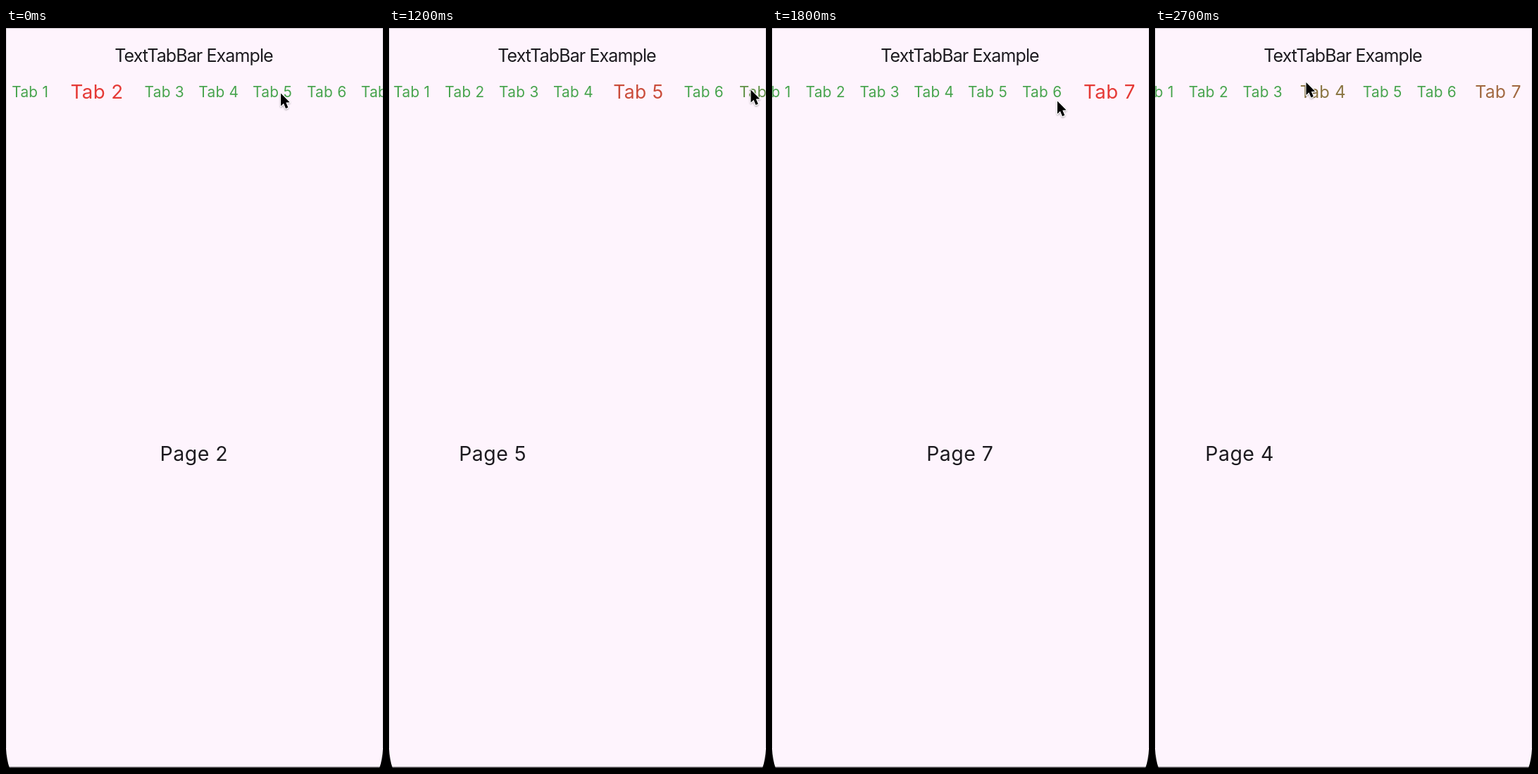
Animation, 535 px wide and 1048 px high, one loop 2.8 s. Source, as an HTML page:

```html
<!DOCTYPE html>
<html lang="en">
<head>
<meta charset="utf-8">
<title>TextTabBar Example</title>
<style>
  html, body { margin: 0; width: 100%; height: 100%; overflow: hidden; background: #fef4fd; }
  svg { display: block; width: 100%; height: 100%; }
  text { font-family: Inter, Roboto, "Open Sans", sans-serif; fill: #1d1b20; white-space: pre; }
  .title { font-size: 25px; letter-spacing: -0.9px; text-anchor: middle; }
  .page { font-size: 28.5px; letter-spacing: 0.016em; text-anchor: middle; }
  .tab { letter-spacing: 0.014em; }
</style>
</head>
<body>
<svg viewBox="0 0 535 1048">
  <defs>
    <filter id="shadow" x="-50%" y="-50%" width="200%" height="200%">
      <feDropShadow dx="0" dy="1.2" stdDeviation="1.2" flood-opacity="0.35"/>
    </filter>
  </defs>
  <rect width="535" height="1048" fill="#fef4fd"/>
  <text class="title" x="266.5" y="47.5">TextTabBar Example</text>
  <g id="pages"></g>
  <g id="tabs"></g>
  <path d="M0 0.5H535" stroke="#c9c2c9"/>
  <path d="M0.25 0V1020M534.75 0V1020" stroke="#a8a2a8" stroke-width="0.5"/>
  <path d="M0 1046.5H535" stroke="#9a959a"/>
  <path d="M0 1047.5H535" stroke="#3c3a3c"/>
  <path d="M0 1020Q0.8 1036 5 1048H0ZM535 1020Q534.2 1036 530 1048H535Z"/>
  <path id="cursor" d="M0 0V18L4 14.2L7 21.5L10.3 20L7.3 13L12.6 12.8Z" stroke="#fff"
    stroke-width="2" stroke-linejoin="round" paint-order="stroke" filter="url(#shadow)"/>
</svg>
<script>
const LOOP = 2800, STEP = 100, DURATION = 500;
const WIDTH = 535, CENTER = 266.8;
const TAB_COUNT = 7, TAB_PITCH = 76.8, TAB_GROWTH = 38.5, TAB_INSET = 10.4;
const GREEN = [71, 164, 77], RED = [229, 58, 54];

// Tab changes: start time, tabs left and entered, scroll before and after
const moves = [
  { start: 85, from: 2, to: 5, scroll: [0, 0] },
  { start: 1116, from: 5, to: 7, scroll: [0, 33.5] },
  { start: 2484, from: 7, to: 4, scroll: [33.5, 33.5] }
];

// Pointer path: time, x, y
const pointer = [
  [0, 390, 92.5], [350, 390, 92.5], [600, 492.5, 92.5], [1000, 513.5, 87.5],
  [1700, 513.5, 87.5], [1800, 405, 103.5], [1900, 335, 104.5], [2000, 275, 97],
  [2100, 235, 83], [2200, 218.5, 77], [2300, 214.5, 77], [LOOP, 214.5, 77]
];

const lerp = (a, b, k) => a + (b - a) * k;
const clamp = v => Math.min(1, Math.max(0, v));

function bezier(x1, y1, x2, y2) {
  const at = (a, b, s) => 3 * a * s * (1 - s) ** 2 + 3 * b * s * s * (1 - s) + s ** 3;
  return x => {
    if (x <= 0 || x >= 1) return clamp(x);
    let lo = 0, hi = 1;
    for (let i = 0; i < 24; i++) {
      const mid = (lo + hi) / 2;
      if (at(x1, x2, mid) < x) lo = mid; else hi = mid;
    }
    return at(y1, y2, lo);
  };
}
const ease = bezier(0.25, 0.1, 0.25, 1);
const easeInOut = bezier(0.42, 0, 0.58, 1);

function addText(parent, className, content = "") {
  const el = document.createElementNS("http://www.w3.org/2000/svg", "text");
  el.setAttribute("class", className);
  el.textContent = content;
  document.getElementById(parent).append(el);
  return el;
}
const tabs = Array.from({ length: TAB_COUNT }, (_, i) => addText("tabs", "tab", `Tab ${i + 1}`));
const pages = [addText("pages", "page"), addText("pages", "page")];
const cursor = document.getElementById("cursor");

function drawTabs(move, p) {
  const scroll = lerp(...move.scroll, easeInOut(p));
  let grown = 0;
  tabs.forEach((tab, i) => {
    const n = i + 1;
    const active = n === move.from ? 1 - p : n === move.to ? p : 0;
    const size = lerp(20.8, 27.7, active);
    const left = i ? 81.5 + TAB_PITCH * (i - 1) : 8.5;
    const color = GREEN.map((c, k) => Math.round(lerp(c, RED[k], active)));
    tab.setAttribute("x", left - 0.015 * size + grown + TAB_INSET * active - scroll);
    tab.setAttribute("y", 90 + 0.3635 * size);
    tab.style.fontSize = size + "px";
    tab.style.fill = `rgb(${color})`;
    grown += TAB_GROWTH * active;
  });
}

function drawPages(move, p) {
  const dir = Math.sign(move.to - move.from);
  const shift = ease(p);
  [move.from, move.to].forEach((n, i) => {
    pages[i].textContent = `Page ${n}`;
    pages[i].setAttribute("x", CENTER + dir * WIDTH * (i - shift));
    pages[i].setAttribute("y", 613.2);
  });
}

function drawCursor(t) {
  const i = pointer.findIndex(k => k[0] > t);
  const [t0, x0, y0] = pointer[i - 1], [t1, x1, y1] = pointer[i];
  const k = (t - t0) / (t1 - t0);
  cursor.setAttribute("transform", `translate(${lerp(x0, x1, k)} ${lerp(y0, y1, k)})`);
}

function draw(time) {
  const t = Math.floor((time % LOOP) / STEP) * STEP;
  const move = moves.findLast(m => m.start <= t) || moves[0];
  const p = clamp((t - move.start) / DURATION);
  drawTabs(move, p);
  drawPages(move, p);
  drawCursor(t);
}

const begin = performance.now();
function tick() {
  draw(performance.now() - begin);
  requestAnimationFrame(tick);
}
tick();
</script>
</body>
</html>
```
